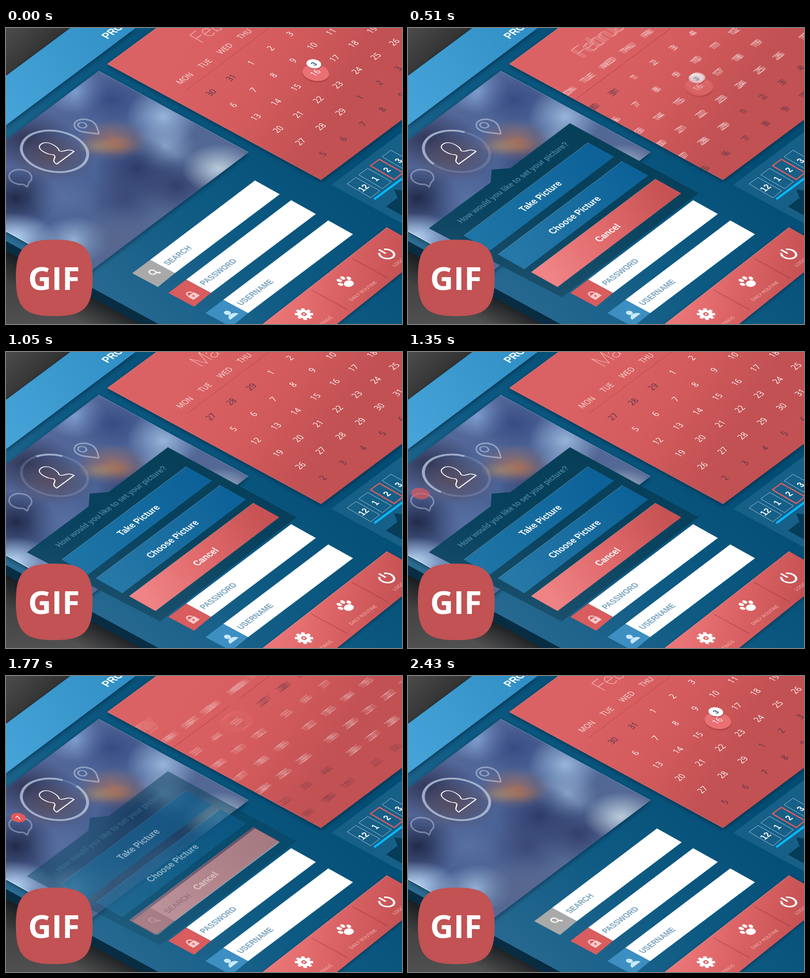
Animation of 800 by 600 pixels, one loop 2.55 s. Source, as an HTML page with a canvas:

```html
<!DOCTYPE html>
<html lang="en">
<head>
<meta charset="utf-8">
<title>Isometric interface</title>
<style>
html, body { margin: 0; width: 100%; height: 100%; overflow: hidden; background: #333; }
canvas { display: block; }
</style>
</head>
<body>
<canvas id="stage" width="800" height="600"></canvas>
<script>
const LOOP = 2550, STEP = 30, PAGE = 7.4;
const SANS = '"Liberation Sans", Arial, sans-serif';
const OPEN = '"Open Sans", "Noto Sans", sans-serif';
const stage = document.getElementById('stage').getContext('2d');
const still = document.createElement('canvas');
still.width = 800;
still.height = 600;
let g = still.getContext('2d');

const clamp = v => Math.max(0, Math.min(1, v));
const ramp = (t, from, to) => clamp((t - from) / (to - from));

function linear(x0, y0, x1, y1, ...colors) {
  const fill = g.createLinearGradient(x0, y0, x1, y1);
  colors.forEach((c, i) => fill.addColorStop(i / (colors.length - 1), c));
  return fill;
}

function trace(...p) {
  g.beginPath();
  for (let i = 0; i < p.length; i += 2) g.lineTo(p[i], p[i + 1]);
  g.closePath();
}

function poly(fill, ...p) {
  trace(...p);
  g.fillStyle = fill;
  g.fill();
}

function shadowed(blur, dy, draw) {
  g.save();
  g.shadowColor = 'rgba(0,20,40,.55)';
  g.shadowBlur = blur;
  g.shadowOffsetY = dy;
  draw();
  g.restore();
}

function line(color, width, x0, y0, x1, y1) {
  g.strokeStyle = color;
  g.lineWidth = width;
  g.beginPath();
  g.moveTo(x0, y0);
  g.lineTo(x1, y1);
  g.stroke();
}

// Runs a drawing routine in the coordinates of the tilted surface.
function tilted(x, y, draw) {
  g.save();
  g.transform(.7, -.515, .93, .52, x, y);
  draw();
  g.restore();
}

function label(text, x, y, size, color, weight = 400, family = SANS, align = 'center') {
  tilted(x, y, () => {
    g.font = `${weight} ${size}px ${family}`;
    g.textAlign = align;
    g.fillStyle = color;
    g.fillText(text, 0, size * .36);
  });
}

function circle(x, y, r, fill) {
  g.beginPath();
  g.arc(x, y, r, 0, 7);
  g.fillStyle = fill;
  g.fill();
}

const disk = (x, y, r, fill) => tilted(x, y, () => circle(0, 0, r, fill));

function blob(x, y, rx, ry, rgb, alpha) {
  g.save();
  g.translate(x, y);
  g.scale(rx, ry);
  const fill = g.createRadialGradient(0, 0, 0, 0, 0, 1);
  fill.addColorStop(0, `rgba(${rgb},${alpha})`);
  fill.addColorStop(.5, `rgba(${rgb},${alpha * .5})`);
  fill.addColorStop(1, `rgba(${rgb},0)`);
  circle(0, 0, 1, fill);
  g.restore();
}

function drawDevice() {
  g.fillStyle = linear(0, 0, 60, 600, '#3a3a3a', '#222', '#505050');
  g.fillRect(0, 0, 800, 600);
  poly(linear(0, 0, 60, 60, '#4c4c4c', '#333'), 0, 0, 130, 0, 0, 97);
  poly(linear(90, 480, 55, 545, '#0d1418', 'rgba(20,22,24,0)'), 0, 432, 308, 600, 160, 600, 0, 520);
  poly('#082d43', 0, 430, 312, 600, 272, 600, 0, 452);
  poly(linear(200, 600, 600, 150, '#2b6b92', '#0d5a83', '#024d74'),
    0, 97, 130, 0, 800, 0, 800, 600, 308, 600, 0, 432);
  shadowed(8, 3, () => poly(linear(0, 160, 230, 0, '#46a3d7', '#3190c6'), 0, 97, 130, 0, 262, 0, 0, 197));
  label('PROFILE', 198, 19, 22, '#fff', 700, SANS, 'left');
}

function drawPhoto() {
  const edge = [187, 87, 490, 252, 161, 500, 0, 412, 0, 228];
  shadowed(10, 3, () => poly('#4b6290', ...edge));
  g.save();
  trace(...edge);
  g.clip();
  g.fillStyle = linear(80, 140, 340, 400, '#56699a', '#4a6295', '#586b94');
  g.fillRect(0, 80, 500, 430);
  blob(40, 225, 100, 60, '42,46,76', .85);
  blob(140, 130, 65, 45, '130,160,210', .9);
  blob(215, 145, 75, 55, '50,70,128', .8);
  blob(318, 180, 75, 60, '155,185,222', .95);
  blob(320, 240, 65, 50, '145,172,208', .85);
  blob(410, 225, 60, 45, '85,105,150', .6);
  blob(265, 285, 85, 65, '40,52,98', .85);
  blob(345, 320, 80, 60, '44,56,102', .85);
  blob(240, 345, 80, 60, '50,62,108', .7);
  blob(20, 345, 85, 65, '32,40,72', .95);
  blob(95, 262, 85, 50, '92,72,82', .75);
  blob(215, 228, 75, 42, '165,112,95', .85);
  blob(225, 238, 45, 20, '190,120,75', .5);
  blob(185, 240, 40, 18, '180,155,105', .45);
  blob(430, 285, 75, 50, '190,208,222', .95);
  blob(120, 345, 75, 50, '92,116,165', .75);
  blob(15, 425, 85, 50, '190,220,248', .95);
  blob(140, 430, 75, 48, '160,190,222', .85);
  blob(225, 430, 90, 65, '88,102,140', .85);
  g.restore();
  line('rgba(190,210,235,.4)', 1, 187, 87, 490, 252);
  line('rgba(220,235,250,.8)', 1.5, 0, 412, 60, 445);
}

function drawPhotoIcons() {
  g.lineJoin = 'round';
  tilted(120, 263, () => {
    g.strokeStyle = '#fff';
    g.lineWidth = 2;
    g.beginPath();
    g.moveTo(-25, 0);
    for (const side of [-1, 1]) {
      const curve = side < 0
        ? [[-25, -15, -8, -10, -8, -20], [-16, -26, -18, -53, 0, -53]]
        : [[18, -53, 16, -26, 8, -20], [8, -10, 25, -15, 25, 0]];
      curve.forEach(c => g.bezierCurveTo(...c));
    }
    g.closePath();
    g.stroke();
  });

  g.strokeStyle = 'rgba(200,210,230,.55)';
  g.lineWidth = 3;
  g.beginPath();
  g.moveTo(188, 215);
  g.bezierCurveTo(184, 200, 182, 188, 160, 185);
  g.bezierCurveTo(138, 184, 132, 198, 144, 206);
  g.bezierCurveTo(154, 213, 172, 212, 188, 215);
  g.stroke();
  tilted(154, 197, () => {
    g.beginPath();
    g.arc(0, 0, 7.5, 0, 7);
    g.stroke();
  });
  g.strokeStyle = 'rgba(200,210,230,.45)';
  g.beginPath();
  g.ellipse(29, 302, 23, 15, .1, 1.25, 6.9);
  g.lineTo(43, 322);
  g.lineTo(35, 317);
  g.stroke();
}

function drawField(x, y, text, color) {
  poly('#fff', x, y, x + 50, y + 28, x - 162, y + 188, x - 212, y + 161);
  poly(color, x - 212, y + 161, x - 162, y + 188, x - 196, y + 216, x - 248, y + 188);
  label(text, x - 181, y + 170, 16.5, '#7ba3bf', 700, SANS, 'left');
}

function drawFields() {
  drawField(503, 309, 'SEARCH', '#a9a9a9');
  drawField(576, 349, 'PASSWORD', '#d95c5e');
  drawField(651, 390, 'USERNAME', '#3d8fc2');
  tilted(298, 497, () => {
    g.strokeStyle = '#fff';
    g.lineWidth = 2.5;
    g.beginPath();
    g.arc(1, -3, 6, 0, 7);
    g.stroke();
    line('#fff', 4, 5, 2, 10, 8);
  });
  tilted(375, 541, () => {
    g.fillStyle = '#f8c9c9';
    g.fillRect(-9, -2, 18, 13);
    g.strokeStyle = '#f8c9c9';
    g.lineWidth = 3;
    g.beginPath();
    g.arc(0, -3, 6, Math.PI, 0);
    g.stroke();
    circle(0, 4, 2.2, '#d95c5e');
  });
  tilted(452, 580, () => {
    circle(0, -5, 6, '#c9e9fa');
    g.beginPath();
    g.ellipse(0, 10, 12, 9, 0, Math.PI, 0);
    g.fill();
  });
}

function drawClock() {
  poly('#165f87', 657, 318, 800, 211, 800, 396);
  [12, 1, 2, 3].forEach((hour, i) => {
    const x = 722 + 23.6 * i, y = 324 - 18.4 * i;
    g.strokeStyle = hour === 2 ? '#d95c5e' : 'rgba(205,225,238,.75)';
    g.lineWidth = hour === 2 ? 2.5 : 1;
    trace(x - 33, y - 8, x - 15, y - 21, x + 33, y + 6, x + 15, y + 20);
    g.stroke();
    label(hour, x, y, 18, '#fff', 700);
  });
  line('#06b8fb', 4.5, 744, 347, 802, 304);
  poly('#063c58', 768, 362, 791, 344, 784, 327, 800, 329, 800, 380);
}

function drawMenu() {
  shadowed(7, 2, () => poly(linear(560, 540, 770, 600, '#ea7577', '#d96163', '#c45153'),
    770, 404, 800, 421, 800, 495, 669, 600, 519, 600));
  line('rgba(255,180,180,.7)', 1, 770, 404, 519, 600);
  line('rgba(130,40,50,.5)', 1.3, 617, 531, 690, 571);
  line('rgba(130,40,50,.5)', 1.3, 699, 467, 772, 507);
  label('SETTINGS', 640, 598, 9.8, '#f6bcbc');
  label('DAILY ROUTINE', 721, 533, 9.8, '#f6bcbc');
  label('LOGOUT', 797, 472, 9.8, '#f6bcbc');

  tilted(602, 580, () => {
    g.fillStyle = '#fff';
    for (let i = 0; i < 8; i++) {
      g.fillRect(-3, -16, 6, 8);
      g.rotate(Math.PI / 4);
    }
    circle(0, 0, 12, '#fff');
    circle(0, 0, 5, '#dd6668');
    circle(0, 0, 2, '#fff');
  });
  tilted(687, 515, () => {
    g.fillStyle = '#fff';
    g.beginPath();
    g.ellipse(0, 6, 10, 8, 0, 0, 7);
    g.fill();
    for (const [x, y] of [[-12, -3], [-5, -11], [5, -11], [12, -3]]) {
      g.beginPath();
      g.ellipse(x, y, 3.8, 5, x * .03, 0, 7);
      g.fill();
    }
  });
  tilted(769, 458, () => {
    g.strokeStyle = '#fff';
    g.lineWidth = 4;
    g.beginPath();
    g.arc(0, 0, 13, -1, 4.14);
    g.stroke();
    line('#fff', 4, 0, -17, 0, -2);
  });
}

const calendarEdge = [205, 73, 304, 0, 800, 0, 800, 186, 637, 308];

function drawCalendarBase() {
  shadowed(8, 3, () => poly(linear(340, 60, 620, 230, '#db6264', '#d55c5e', '#c25153'), ...calendarEdge));
  line('rgba(245,150,150,.7)', 1, 304, 0, 205, 73);
  line('rgba(240,140,140,.5)', 1.2, 205, 73, 637, 308);
}

const cell = (c, r) => [
  414 + 45.2 * r + 41.2 * c - .35 * c * c,
  131 + 24.8 * r - 30.5 * c + .17 * c * c
];

const february = { name: 'February', lead: 30, prior: 31, days: 29, picked: true };
const march = { name: 'March', lead: 27, prior: 29, days: 31 };

function drawMonth(month, shift) {
  const before = month.prior - month.lead + 1;
  const [dx, dy] = cell(shift, 0).map((v, i) => v - cell(0, 0)[i]);
  label(month.name, 381 + dx, 24 + dy, 41, '#f9d3d3', 100, 'Roboto, Lato, sans-serif', 'left');
  const [x0, y0] = cell(shift - .4, -.72), [x1, y1] = cell(shift + 6.4, -.72);
  line('rgba(160,55,62,.6)', 1, x0, y0, x1, y1);
  ['MON', 'TUE', 'WED', 'THU', 'FRI', 'SAT', 'SUN'].forEach((day, c) => {
    const [x, y] = cell(c + shift, -1.17);
    label(day, x, y, 16, '#fbe3e3', 400, OPEN);
  });
  if (month.picked) {
    const [x, y] = cell(6 + shift, 0);
    tilted(x, y, () => {
      g.strokeStyle = 'rgba(250,170,170,.6)';
      g.lineWidth = 1;
      g.beginPath();
      g.arc(0, 0, 22, 0, 7);
      g.stroke();
    });
    const [px, py] = cell(3 + shift, 2);
    disk(px + 1, py + 3, 23, 'rgba(140,35,40,.35)');
    disk(px + 1, py, 23, '#e97073');
  }
  for (let i = 0; i < 42; i++) {
    const [x, y] = cell(i % 7 + shift, Math.floor(i / 7));
    if (x < 180 || x > 830) continue;
    const day = i - before + 1;
    const inside = day > 0 && day <= month.days;
    const number = day < 1 ? month.prior + day : inside ? day : day - month.days;
    label(number, x, y, 17, inside ? '#fff' : '#4f3548', 400, OPEN);
  }
  if (month.picked) {
    const [x, y] = cell(3 + shift, 2);
    disk(x - 2, y - 16, 13, 'rgba(120,30,40,.4)');
    disk(x - 3, y - 18, 12.8, '#fff');
    label('3', x - 3, y - 18, 14, '#24506d', 700);
  }
}

function slide(t) {
  if (t < 1000) {
    const p = ramp(t, 360, 830);
    return p < .5 ? 4 * p ** 3 : 1 - 4 * (1 - p) ** 3;
  }
  return 1 - ramp(t, 1410, 2010) ** 2;
}

function drawCalendar(t) {
  const shutter = t < 1000 ? 9 : 26;
  const travel = Math.abs(slide(t + shutter / 2) - slide(t - shutter / 2)) * PAGE * 50;
  const samples = Math.max(1, Math.min(9, Math.ceil(travel / 3)));
  g.save();
  trace(...calendarEdge);
  g.clip();
  for (let i = 0; i < samples; i++) {
    const p = slide(t + shutter * ((i + .5) / samples - .5));
    g.globalAlpha = samples === 1 ? 1 : Math.min(1, 1.6 / samples);
    if (p < 1) drawMonth(february, -PAGE * p);
    if (p > 0) drawMonth(march, PAGE * (1 - p));
  }
  g.restore();
}

function drawRing(t) {
  const progress = t < 30 ? 1 : clamp((t - (t < 930 ? 130 : 930)) * .0011);
  const start = -.4;
  tilted(98, 250, () => {
    g.lineWidth = 5;
    g.strokeStyle = 'rgba(190,205,230,.2)';
    g.beginPath();
    g.arc(0, 0, 57.5, 0, 7);
    g.stroke();
    g.strokeStyle = 'rgba(185,200,225,.72)';
    g.beginPath();
    g.arc(0, 0, 57.5, start, start - progress * Math.PI * 2, true);
    if (progress > 0) g.stroke();
  });
}

function drawNotice(t) {
  const alpha = ramp(t, 1290, 1380) * (1 - ramp(t, 2160, 2430));
  if (!alpha) return;
  g.save();
  g.globalAlpha = alpha;
  disk(25, 287, 13 + 4.5 * (1 - ramp(t, 1290, 1470)), '#e2595c');
  g.globalAlpha = alpha * ramp(t, 1380, 1500);
  label('7', 25, 287, 14, '#fff', 700);
  g.restore();
}

function button(x, y, text, ...colors) {
  poly(linear(x - 225, y + 175, x + 20, y + 20, ...colors),
    x, y, x + 52, y + 29, x - 198, y + 219, x - 251, y + 189);
  line('rgba(255,255,255,.3)', 1, x, y, x - 251, y + 189);
  label(text, x - 97, y + 109, 19, '#fff', 700);
}

function drawPopup(t) {
  const alpha = ramp(t, 60, 300) * (1 - ramp(t, 1650, 1890));
  if (!alpha) return;
  g.save();
  g.globalAlpha = alpha;
  poly(linear(330, 200, 290, 540, 'rgba(5,61,86,.98)', 'rgba(8,66,94,.98)', 'rgba(26,79,107,.97)'),
    42, 406, 167, 313, 169, 287, 207, 284, 327, 193, 587, 335, 311, 546);
  label('How would you like to set your picture?', 212, 313, 16.5, '#42809c', 700);
  button(364, 232, 'Take Picture', '#1d74a5', '#0c6298');
  button(433, 270, 'Choose Picture', '#2678a7', '#0c6298');
  button(500, 306, 'Cancel', '#ef8385', '#df686a', '#c65254');
  g.restore();
}

function drawTag() {
  g.fillStyle = '#c25254';
  g.beginPath();
  g.moveTo(20, 506);
  g.bezierCurveTo(20, 446, 37, 429, 97.5, 429);
  g.bezierCurveTo(158, 429, 175, 446, 175, 506);
  g.bezierCurveTo(175, 567, 158, 584, 97.5, 584);
  g.bezierCurveTo(37, 584, 20, 567, 20, 506);
  g.fill();
  g.font = `700 65px ${OPEN}`;
  g.textAlign = 'center';
  g.fillStyle = '#fff';
  g.fillText('GIF', 97, 531);
}

drawDevice();
drawPhoto();
drawPhotoIcons();
drawFields();
drawClock();
drawMenu();
drawCalendarBase();
g = stage;

function frame(now) {
  const t = Math.floor(now % LOOP / STEP) * STEP;
  g.drawImage(still, 0, 0);
  drawCalendar(t);
  drawRing(t);
  drawNotice(t);
  drawPopup(t);
  drawTag();
}

const begin = performance.now();
function tick() {
  frame(performance.now() - begin);
  requestAnimationFrame(tick);
}
tick();
</script>
</body>
</html>
```
